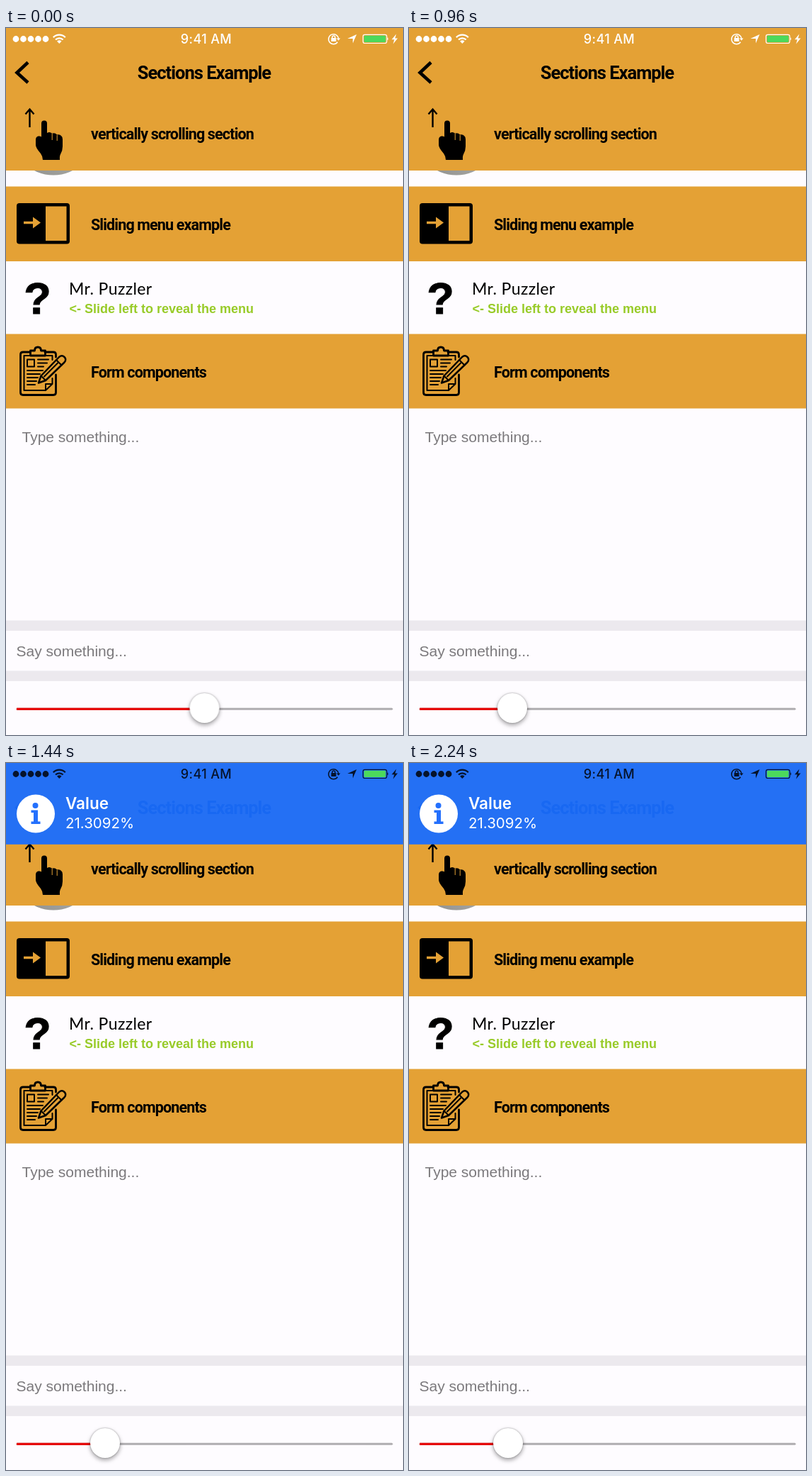
These frames come from a looping animation (561 by 997 pixels, 2.4 s). An HTML page:

```html
<!DOCTYPE html>
<html lang="en">
<head>
<meta charset="utf-8">
<title>Sections Example</title>
<style>
html, body { margin: 0; width: 100%; height: 100%; overflow: hidden; background: #fefcff; }
svg { display: block; width: 100%; height: 100%; }
.bar { fill: #e4a135; }
.gap { fill: #ece9ee; }
.title { font: 700 25.5px Roboto, sans-serif; letter-spacing: -1px; text-anchor: middle; }
.section { font: 700 21.5px Roboto, sans-serif; letter-spacing: -.85px; }
.name { font: 400 23px Lato, sans-serif; letter-spacing: .4px; }
.tip { font: 700 18px "Liberation Sans", sans-serif; fill: #98cb28; }
.hint { font: 400 21px "Liberation Sans", sans-serif; fill: #7b797c; }
.mark { font: 700 63px "Liberation Sans", sans-serif; text-anchor: middle; stroke: #000; }
.clock { font: 500 18px Inter, sans-serif; letter-spacing: .4px; text-anchor: middle; fill: currentColor; }
.label { font: 600 22.5px Inter, sans-serif; fill: #fff; }
.value { font: 400 20.5px Inter, sans-serif; fill: #fff; }
.line { fill: none; stroke: #000; }
.thumb, .banner, .status { animation: slide 2.4s step-end infinite; }
.banner { animation-name: drop; }
.status { animation-name: tint; }
.thumb circle { fill: #fff; filter: drop-shadow(0 3px 3px rgba(0, 0, 0, .28)) drop-shadow(0 0 1px rgba(0, 0, 0, .35)); }

@keyframes slide {
  0% { transform: translateX(280.5px); }
  13.32% { transform: translateX(278px); }
  19.99% { transform: translateX(254px); }
  26.66% { transform: translateX(222px); }
  33.32% { transform: translateX(182px); }
  39.99% { transform: translateX(146px); }
  46.66%, 100% { transform: translateX(140px); }
}
@keyframes drop {
  0% { transform: translateY(-150px); }
  53.32% { transform: translateY(-10.5px); }
  59.99%, 100% { transform: none; }
}
@keyframes tint {
  0% { color: #fff; }
  53.32%, 100% { color: #06132b; }
}
</style>
</head>
<body>
<svg viewBox="0 0 561 997" preserveAspectRatio="none">
  <defs>
    <linearGradient id="photo">
      <stop offset="0" stop-color="#8d8d8a"/>
      <stop offset="1" stop-color="#a9a9a6"/>
    </linearGradient>
    <clipPath id="track"><rect x="15" y="925" width="546" height="72"/></clipPath>
  </defs>

  <rect width="561" height="997" fill="#fefcff"/>
  <circle cx="67" cy="147.5" r="60" fill="url(#photo)"/>

  <g class="bar">
    <rect width="561" height="201"/>
    <rect y="223.5" width="561" height="105.5"/>
    <rect y="431.5" width="561" height="105"/>
  </g>
  <g class="gap">
    <rect y="835.5" width="561" height="14.5"/>
    <rect y="906.5" width="561" height="14.5"/>
  </g>

  <path class="line" d="M31 48.5 15.5 63 31 77" stroke-width="4.6"/>
  <text class="title" x="280" y="72">Sections Example</text>

  <!-- pointing hand -->
  <path class="line" d="M33.5 140V115M27.5 121.5l6-7 6 7" stroke-width="2.4"/>
  <path d="M50 157V134.5a4 4 0 0 1 8 0V148q4-2.500 7 .8 4-1.800 7 1.700 4-1 6 1.500 2 1.500 2 5V167q0 6-3 11-1.500 2.500-1 8H52q0-5-3-9-7-8-7-12V157.500q0-4 3.500-5 3-.5 4.500 1z"/>
  <path class="line" d="M65.200 149v9M72.200 151v8" stroke="#e4a135" stroke-width="1" style="stroke:#e4a135"/>
  <text class="section" x="120" y="157">vertically scrolling section</text>

  <!-- side panel -->
  <rect x="15" y="247" width="75" height="57.500" rx="4"/>
  <g class="bar">
    <rect x="56" y="251.500" width="29.500" height="48.500"/>
    <path d="M25 272.800h13v-6.300l11 8-11 8v-6.300H25z"/>
  </g>
  <text class="section" x="120" y="285">Sliding menu example</text>

  <text class="mark" x="44.500" y="402.500">?</text>
  <text class="name" x="89" y="376">Mr. Puzzler</text>
  <text class="tip" x="89.500" y="401.500">&lt;- Slide left to reveal the menu</text>

  <!-- clipboard and pencil -->
  <g class="line" stroke-width="2.800" stroke-linejoin="round" stroke-linecap="round">
    <path d="M34 457H24q-3.500 0-3.500 3.500V514q0 3.500 3.500 3.500H67q3.500 0 3.500-3.500V489M55 457H67q3.500 0 3.500 3.500V464"/>
    <path d="M34.500 462v-7h6q0-5 4.500-5t4.500 5h6v7z"/>
    <g stroke-width="2">
      <path d="M33 462H25.500V511H56l9.500-9V494M56 511v-9h9.500M56 462h9.500v6"/>
      <path d="M30 467.500h10v10H30zM45 467.500h15M45 472.500h13M45 477.500h8M30 483h22M30 488h18M30 493h15M30 498h13M30 503h11"/>
    </g>
    <path d="M46 500.500l3.500-10L75 464q4-3.500 7.500 0t0 7.500L56 497z" fill="#e4a135" stroke-width="2.500"/>
    <path d="M49.500 490.500l6.500 6.500M71 468l7.500 7.500M54 491.500L73.500 472" stroke-width="2"/>
  </g>
  <text class="section" x="120" y="493">Form components</text>

  <text class="hint" x="22.500" y="584">Type something...</text>
  <text class="hint" x="14.500" y="886">Say something...</text>

  <!-- slider -->
  <path d="M16 960.300H545" stroke="#afadb0" stroke-width="3" stroke-linecap="round"/>
  <g clip-path="url(#track)">
    <g class="thumb">
      <path d="M-300 960.300H0" stroke="#e60606" stroke-width="3.200"/>
      <circle cy="959" r="21"/>
    </g>
  </g>

  <g class="banner">
    <rect y="-30" width="561" height="144.800" fill="#1a6eff" fill-opacity=".95"/>
    <circle cx="42" cy="71.500" r="27" fill="#fff"/>
    <g fill="#2470fd">
      <circle cx="41.500" cy="60" r="4"/>
      <path d="M35.500 66.500H45V82.500h3.500V86h-13V82.500H39V70H35.500z"/>
    </g>
    <text class="label" x="84" y="65">Value</text>
    <text class="value" x="84" y="92">21.3092%</text>
  </g>

  <g class="status">
    <path d="M14 15.500h.01M24.500 15.500h.01M35 15.500h.01M45.500 15.500h.01M56 15.500h.01" stroke="currentColor" stroke-width="8.800" stroke-linecap="round"/>
    <g fill="none" stroke="currentColor" stroke-width="2.300">
      <path d="M66.800 13.200a12 12 0 0 1 17 0M70 16.500a7.500 7.500 0 0 1 10.600 0"/>
    </g>
    <path d="M75.300 22l-3.200-3.300a4.500 4.500 0 0 1 6.400 0z" fill="currentColor"/>
    <text class="clock" x="283" y="22">9:41 AM</text>
    <g fill="none" stroke="currentColor" stroke-width="1.500">
      <path d="M468.500 19.800a7 7 0 1 1 1.300-4.500M461 14.500v-1.500a2 2 0 0 1 4 0v1.500"/>
      <rect x="504.500" y="9.300" width="33.500" height="12.200" rx="2.500" stroke-width="1.200"/>
    </g>
    <g fill="currentColor">
      <path d="M459.500 14h7v5h-7zM467 14.500h5.500l-2.700 3.300zM495.500 9L490 21.500V15h-7.500zM539 13q2.200 2.300 0 4.600zM551.500 8.500L545 16.200h3.700L547 22.500l6.500-8h-3.700z"/>
    </g>
    <rect x="506" y="10.800" width="30.500" height="9.200" rx="1.200" fill="#4cd95c"/>
  </g>
</svg>
</body>
</html>
```
